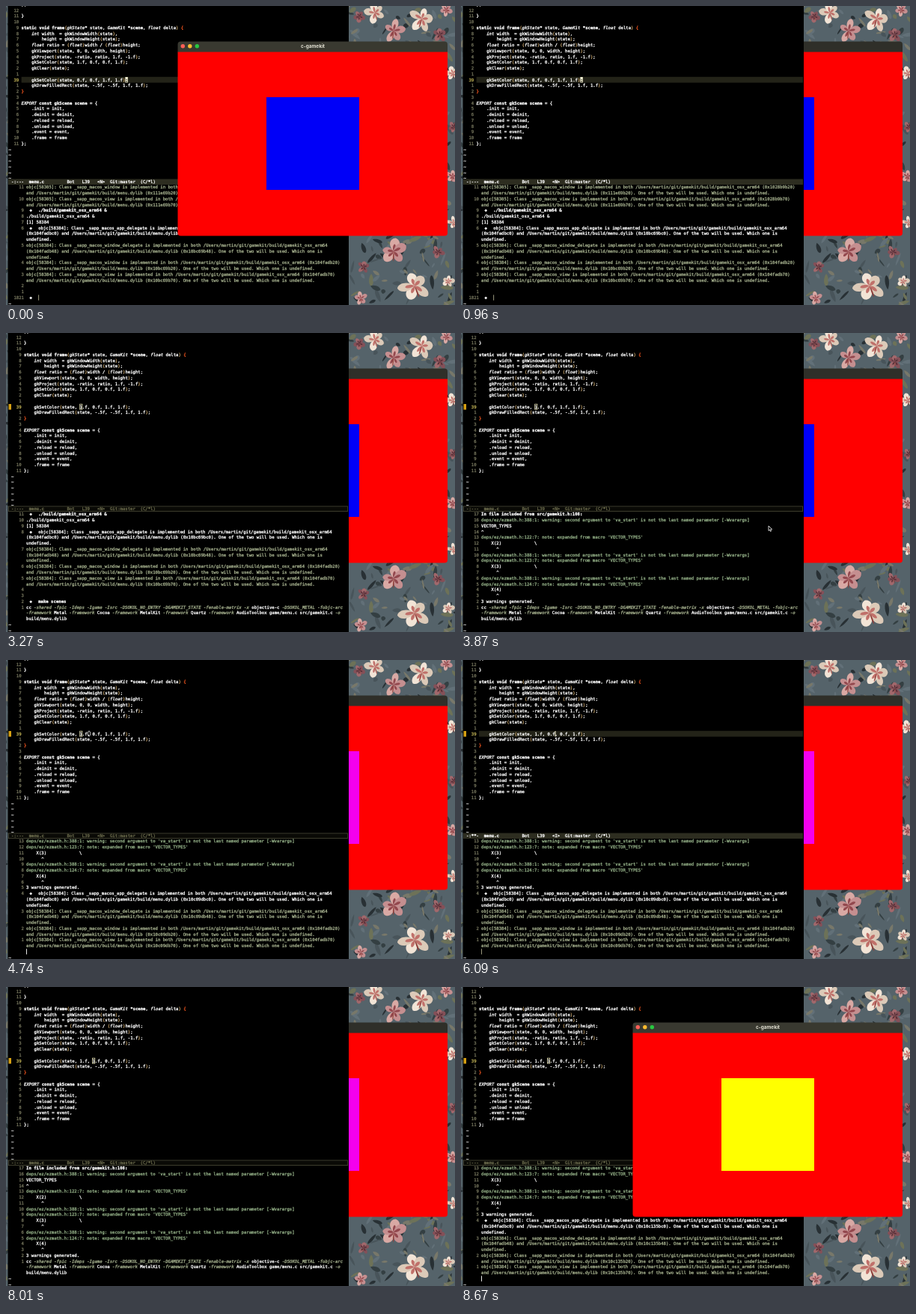
Animation, 600 px wide and 400 px high, one loop 8.7 s. Source, as an HTML page with a canvas:

```html
<!DOCTYPE html>
<html lang="en">
<head>
<meta charset="utf-8">
<title>Live reload</title>
<style>
html, body { margin: 0; width: 100%; height: 100%; overflow: hidden; background: #000; }
canvas { display: block; width: 600px; height: 400px; }
</style>
</head>
<body>
<canvas id="stage" width="600" height="400"></canvas>
<script>
const LOOP = 8700;
const CW = 3.385;              // character advance
const CODE_Y = 5.7, CODE_H = 7.75;
const LOG_X = 27, LOG_Y = 242.2, LOG_H = 7.78, LOG_ROWS = 20, LOG_COLS = 125;
const CUR_ROW = 12;
const C = {
  text: '#ffffff', dim: '#a3ae8c', green: '#91ad85', num: '#72725a',
  bar: '#2d2d20', line: '#232318', brace: '#f0541e', paren: '#c9a56a'
};
const ctx = document.getElementById('stage').getContext('2d');

// value of the last step at or before t
const at = (track, t) => {
  let v = track[0][1];
  for (const [time, value] of track) if (time <= t) v = value;
  return v;
};

// ---------- text ----------
function put(str, x, y, color = C.text, style = '') {
  if (!str.trim()) return;
  ctx.save();
  ctx.translate(x, y + 2);
  ctx.scale(0.1, 0.1);
  ctx.font = `${style} 56.2px "DejaVu Sans Mono", monospace`;
  ctx.textRendering = 'geometricPrecision';
  ctx.fillStyle = ctx.strokeStyle = color;
  ctx.lineWidth = 3;
  ctx.fillText(str, 0, 0);
  ctx.strokeText(str, 0, 0);
  ctx.restore();
}

function box(x, y, w, h, color) {
  ctx.fillStyle = color;
  ctx.fillRect(x, y, w, h);
}

// ---------- code pane ----------
const TYPES = /^(EXPORT|float|int|gkState|GameKit)$/;
const STRONG = /^(static|void|frame|const|gkScene|scene)$/;

const codeRows = args => [
  '', '}', '',
  'static void frame(gkState* state, GameKit *scene, float delta) {',
  '    int width  = gkWindowWidth(state),',
  '        height = gkWindowHeight(state);',
  '    float ratio = (float)width / (float)height;',
  '    gkViewport(state, 0, 0, width, height);',
  '    gkProject(state, -ratio, ratio, 1.f, -1.f);',
  '    gkSetColor(state, 1.f, 0.f, 0.f, 1.f);',
  '    gkClear(state);', '',
  `    gkSetColor(state, ${args}, 1.f);`,
  '    gkDrawFilledRect(state, -.5f, -.5f, 1.f, 1.f);',
  '}', '',
  'EXPORT const gkScene scene = {',
  '    .init = init,', '    .deinit = deinit,', '    .reload = reload,',
  '    .unload = unload,', '    .event = event,', '    .frame = frame',
  '};'
];

function codeLine(row, x, y, i) {
  for (const m of row.matchAll(/\w+|[(){}]|[^\w(){}]+/g)) {
    const s = m[0];
    let color = C.text, style = '';
    if (TYPES.test(s)) style = 'italic';
    else if (STRONG.test(s) && !row.startsWith(' ')) style = 'bold';
    if (/[()]/.test(s)) color = C.paren;
    if (/[{}]/.test(s) && (i === 3 || i === 14)) color = C.brace;
    put(s, x + m.index * CW, y, color, style);
  }
}

const ARGS = [
  [0, '0.f, 0.f, 1.f'], [1750, '1.f, 0.f, 1.f'], [5430, '1.f, 0.f, 0.f'],
  [6210, '1.f, 0., 0.f'], [6270, '1.f, 0, 0.f'], [6330, '1.f, , 0.f'],
  [6420, '1.f, 1, 0.f'], [6480, '1.f, 1., 0.f'], [6540, '1.f, 1.f, 0.f']
];
const COL = [
  [0, 37], [1230, 33], [1350, 28], [1470, 23], [1590, 18], [5100, 23], [5250, 28],
  [5640, 23], [5790, 26], [6210, 25], [6270, 24], [6330, 23], [6420, 24],
  [6480, 25], [6540, 26], [6600, 23]
];
const INSERT = [[0, 0], [5790, 1], [6600, 0]];
const DIRTY = [[0, 0], [1750, 1], [2100, 0], [5430, 1], [6720, 0]];
const MARK = [[0, 0], [2100, 1]];
const UPPER = [[0, 1], [2460, 0], [4890, 1], [6840, 0]];
const FRONT = [[0, 1], [900, 0], [8460, 1]];
const FILL = [[0, '#0000f8'], [4320, '#f400ee'], [8310, '#ffff00']];
const RUNNING = [[0, 0], [3090, 1], [4320, 0], [7680, 1], [8310, 0]];

function codePane(t) {
  const active = at(UPPER, t), insert = at(INSERT, t), mark = at(MARK, t);
  const left = mark ? 24 : 20.6;
  const y = CODE_Y + CUR_ROW * CODE_H;
  const rows = codeRows(at(ARGS, t));
  if (active) box(left, y - 3.9, 457 - left, 7.8, C.line);
  if (mark) box(3.5, y - 3.7, 3.5, 7.6, '#d6a012');

  put(');', left, CODE_Y - CODE_H, C.text);
  rows.forEach((row, i) => {
    const n = i === CUR_ROW ? '39' : String(Math.abs(i - CUR_ROW));
    const cy = CODE_Y + i * CODE_H;
    put(n, left - (n.length + 1) * CW, cy, i === CUR_ROW ? '#b5a850' : C.num);
    codeLine(row, left, cy, i);
  });
  for (let i = rows.length; i < rows.length + 6; i++) {
    put('~', mark ? 7 : 3.6, CODE_Y + i * CODE_H, C.text);
  }

  const col = at(COL, t), cx = left + (col + 4) * CW;
  if (!active) {
    ctx.strokeStyle = '#e6e2b4';
    ctx.lineWidth = 0.8;
    ctx.strokeRect(cx + 0.2, y - 3.5, CW - 0.2, 7);
  } else if (insert) {
    box(cx, y - 3.7, 1, 7.4, '#fffbd8');
  } else {
    box(cx, y - 3.7, CW, 7.4, '#fffbd8');
    put(rows[CUR_ROW][col + 4] || '', cx, y, '#111');
  }

  box(3, 231, 455, 8.5, '#000');
  box(3, 231.5, 454, 7.5, active ? C.bar : '#484836');
  if (!active) box(3.8, 232.3, 452.4, 5.9, '#0a0a06');
  const ink = active ? C.text : '#6a6a4c';
  put(at(DIRTY, t) ? '-:**-' : '-:---', 7, 235.3, ink);
  put('menu.c', 7 + 7 * CW, 235.3, ink, 'bold');
  put(`Bot   L39   <${insert ? 'I' : 'N'}>  Git:master  (C/*l)`, 7 + 22 * CW, 235.3, ink);
}

// ---------- shell pane ----------
const line = (s, color = C.text, extra = {}) => ({ s, color, ...extra });
const prompt = (s, num = '', hint = '') => line(s, C.text, { prompt: true, num, hint });
const blank = line('');
const DIR = '/Users/martin/git/gamekit/build';

function clashes(pid, main, lib, first) {
  const parts = [['app_delegate', 'bc0'], ['window_delegate', 'b48'], ['window', 'b20'], ['view', 'b70']];
  return parts.map(([name, end], i) => line(
    `objc[${pid}]: Class _sapp_macos_${name} is implemented in both ${DIR}/gamekit_osx_arm64 ` +
    `(0x${main}${end}) and ${DIR}/menu.dylib (0x${lib}${end}). ` +
    'One of the two will be used. Which one is undefined.',
    i ? C.dim : C.text, { prompt: !i && first }));
}

const WARN = [line('In file included from src/gamekit.h:108:', C.text, { style: 'bold' })];
for (const n of [2, 3, 4]) {
  WARN.push(line("deps/ez/ezmath.h:388:1: warning: second argument to 'va_start' is not the last named parameter [-Wvarargs]", C.green));
  if (n === 2) WARN.push(line('VECTOR_TYPES'), line('^'));
  WARN.push(line(`deps/ez/ezmath.h:12${n}:7: note: expanded from macro 'VECTOR_TYPES'`, C.green),
    line(`    X(${n})` + (n < 4 ? '             \\' : '')), line('      ^'));
}
WARN.push(line('3 warnings generated.'));

const CC = line('cc -shared -fpic -Ideps -Igame -Isrc -DSOKOL_NO_ENTRY -DGAMEKIT_STATE -fenable-matrix ' +
  '-x objective-c -DSOKOL_METAL -fobjc-arc -framework Metal -framework Cocoa -framework MetalKit ' +
  '-framework Quartz -framework AudioToolbox game/menu.c src/gamekit.c -o build/menu.dylib', C.text, { flags: true });

const OLD = [
  ...clashes('58305', '1028b9', '111e69').slice(2),
  prompt('./build/gamekit_osx_arm64 &'), line('./build/gamekit_osx_arm64 &'), line('[1] 58384'),
  ...clashes('58384', '104fad', '10bc69', true), blank, blank
];
const BUILT = [...WARN, CC, blank];
const loaded = lib => [...WARN, ...clashes('58384', '104fad', lib, true), blank];
const RUN1 = loaded('10c09d'), RUN2 = loaded('10c135');

const CMD = 'make scenes';
function typed(t, start, num) {
  const n = Math.max(0, Math.min(CMD.length, Math.floor((t - start) / 42)));
  return prompt(CMD.slice(0, n), num, n > 5 ? CMD.slice(n) : '');
}

function shellLines(t) {
  if (t < 3090) return [...OLD, typed(t, 2520, '1821')];
  if (t < 3420) return [...OLD, prompt(CMD), CC, blank];
  if (t < 4320) return BUILT;
  if (t < 6930) return RUN1;
  if (t < 7680) return [...RUN1, blank, typed(t, 7130, '1865')];
  if (t < 7860) return [...RUN1, blank, prompt(CMD), CC, blank];
  return t < 8310 ? BUILT : RUN2;
}

function wrap(s, indent) {
  const rows = [];
  let rest = s, room = LOG_COLS - indent;
  while (rest.length > room) {
    const cut = rest.lastIndexOf(' ', room);
    rows.push(rest.slice(0, cut));
    rest = rest.slice(cut + 1);
    room = LOG_COLS;
  }
  return [...rows, rest];
}

function shellPane(t) {
  const active = !at(UPPER, t), running = at(RUNNING, t);
  const all = shellLines(t), rows = [];
  all.forEach((l, i) => wrap(l.s, l.prompt ? 5 : 0).forEach((s, k) =>
    rows.push({ s, l, head: k === 0, n: all.length - 1 - i })));
  const view = rows.slice(-LOG_ROWS);

  view.forEach(({ s, l, head, n }, i) => {
    const y = LOG_Y + i * LOG_H;
    const num = n ? String(n) : l.num || '';
    const lead = head && l.prompt;
    const x = lead ? 43.2 : LOG_X;
    const last = n === 0;
    if (last && active && l.prompt) box(LOG_X, y - 3.9, 430, 7.8, '#0d0d09');
    if (head) put(num, 24 - num.length * CW, y, C.num);
    if (lead) put('◆', 31.6, y, C.text);
    if (l.flags) {
      for (const m of s.matchAll(/\S+/g)) {
        const flag = m[0][0] === '-';
        put(m[0], x + m.index * CW, y, flag ? C.dim : C.text, flag ? 'italic' : '');
      }
    } else {
      put(s, x, y, l.color, l.style || (lead && !s.startsWith('objc') ? 'bold' : ''));
    }
    if (!last || running) return;
    const cx = x + s.length * CW;
    if (l.hint) {
      box(cx, y - 3.6, l.hint.length * CW, 7.4, '#77755a');
      put(l.hint, cx, y, '#ffffff', 'bold');
    }
    box(cx, y - 3.6, 0.9, 7.4, active ? '#ffffff' : '#aaa88a');
  });
  if (running) put('~', 3.6, 389.8);
  put('~', 3.6, 397.5);
}

// ---------- wallpaper ----------
function makeWallpaper() {
  const cv = document.createElement('canvas');
  cv.width = 600;
  cv.height = 400;
  const g = cv.getContext('2d');
  let seed = 11;
  const rnd = () => (seed = (seed * 16807) % 2147483647) / 2147483647;
  const petal = (x, y, a, len, wide, color) => {
    g.save();
    g.translate(x, y);
    g.rotate(a);
    g.fillStyle = color;
    g.beginPath();
    g.moveTo(0, 0);
    g.bezierCurveTo(len * 0.3, -wide, len * 0.9, -wide, len, 0);
    g.bezierCurveTo(len * 0.9, wide, len * 0.3, wide, 0, 0);
    g.fill();
    g.restore();
  };
  // loose, uneven petals with a tinted throat and one long stamen
  const flower = (x, y, r, turn, color, shade, heart) => {
    for (let i = 0; i < 5; i++) {
      const a = turn + i * Math.PI * 0.4 + rnd() * 0.4;
      const len = r * (0.75 + rnd() * 0.4);
      petal(x, y, a, len, r * (0.32 + rnd() * 0.16), i % 2 ? color : shade);
      petal(x, y, a, len * 0.55, r * 0.13, heart);
    }
    petal(x, y, turn + 0.9, r * 0.75, r * 0.06, '#8f3f3a');
  };

  g.fillStyle = '#55636a';
  g.fillRect(0, 0, 600, 400);
  const leaves = ['#343f42', '#48545a', '#6d7258', '#283034', '#78786a', '#627078'];
  for (let i = 0; i < 300; i++) {
    petal(452 + rnd() * 148, rnd() * 400, rnd() * 6.3, 6 + rnd() * 13, 1.2 + rnd() * 3, leaves[i % 6]);
  }
  for (let i = 0; i < 60; i++) petal(rnd() * 6 - 3, rnd() * 400, rnd() * 6.3, 8, 2.5, leaves[i % 6]);

  const cream = ['#f2e4d6', '#dccab8', '#c0706a'];
  const pink = ['#d9a9a4', '#c58f90', '#93484e'];
  const rose = ['#a2686c', '#855058', '#573038'];
  const blooms = [
    [493, 9, 14, 0.4, cream], [518, 33, 15, 0.8, pink], [556, 17, 17, 1.0, cream],
    [472, 14, 9, 0.2, rose], [580, 38, 10, 0.7, rose], [588, 5, 9, 0.1, pink],
    [597, 90, 10, 0.5, cream], [598, 162, 9, 0.2, rose], [597, 228, 10, 0.9, pink], [598, 290, 9, 0.6, cream],
    [518, 328, 18, 0.7, pink], [546, 374, 22, 0.3, cream], [478, 349, 9, 0.9, rose],
    [577, 329, 9, 0.2, rose], [474, 391, 9, 0.5, pink], [591, 368, 9, 1.0, cream]
  ];
  for (const [x, y, r, turn, set] of blooms) flower(x, y, r, turn, ...set);
  return cv;
}
const wallpaper = makeWallpaper();

// ---------- game window ----------
function gameWindow(t) {
  const front = at(FRONT, t);
  ctx.save();
  ctx.beginPath();
  ctx.roundRect(229.5, 47.5, 360.5, 260, 4);
  ctx.clip();
  box(229, 47, 362, 15, front ? '#393930' : '#2f2f29');
  box(229, 61.5, 362, 247, '#ff0000');
  box(348, 122, 124, 124, at(FILL, t));
  ['#ff5f57', '#febc2e', '#28c840'].forEach((color, i) => {
    ctx.fillStyle = front ? color : '#55554a';
    ctx.beginPath();
    ctx.arc(236.3 + i * 9.5, 53.8, 2.7, 0, 7);
    ctx.fill();
  });
  ctx.font = 'bold 6.4px Inter, sans-serif';
  ctx.textAlign = 'center';
  ctx.fillStyle = front ? '#e4e2d4' : '#8a887a';
  ctx.fillText('c-gamekit', 410, 56.2);
  ctx.restore();
}

function editor(t) {
  box(2.5, 0, 455.5, 400, '#000');
  ctx.save();
  ctx.beginPath();
  ctx.rect(2.5, 0, 455.5, 400);
  ctx.clip();
  codePane(t);
  shellPane(t);
  ctx.restore();
}

// ---------- pointer ----------
const PATH = [[3630, 431, 282], [3840, 411, 258], [4050, 411, 258], [4650, 111, 98.5], [5040, 111, 98.5]];

function pointer(t) {
  const i = PATH.findIndex(([time], k) => k && t < time);
  if (t < PATH[0][0] || i < 1) return;
  const [t0, x0, y0] = PATH[i - 1], [t1, x1, y1] = PATH[i];
  const k = (t - t0) / (t1 - t0), e = k * k * (3 - 2 * k);
  const x = x0 + (x1 - x0) * e, y = y0 + (y1 - y0) * e;
  ctx.save();
  ctx.translate(x, y);
  ctx.strokeStyle = '#ffffff';
  ctx.lineWidth = 0.8;
  ctx.beginPath();
  if (y < 231) {
    ctx.ellipse(0, 0, 1.6, 3.6, 0, 0, 7);
    ctx.stroke();
  } else {
    ctx.fillStyle = '#000';
    [[0, 0], [0, 6.5], [1.5, 5.2], [2.5, 7.5], [3.5, 7], [2.6, 4.8], [4.6, 4.7]]
      .forEach(p => ctx.lineTo(...p));
    ctx.closePath();
    ctx.fill();
    ctx.stroke();
  }
  ctx.restore();
}

function draw(t) {
  ctx.drawImage(wallpaper, 0, 0);
  const layers = at(FRONT, t) ? [editor, gameWindow] : [gameWindow, editor];
  layers.forEach(layer => layer(t));
  pointer(t);
}

const start = performance.now();
function tick() {
  draw((performance.now() - start) % LOOP);
  requestAnimationFrame(tick);
}
tick();
</script>
</body>
</html>
```
